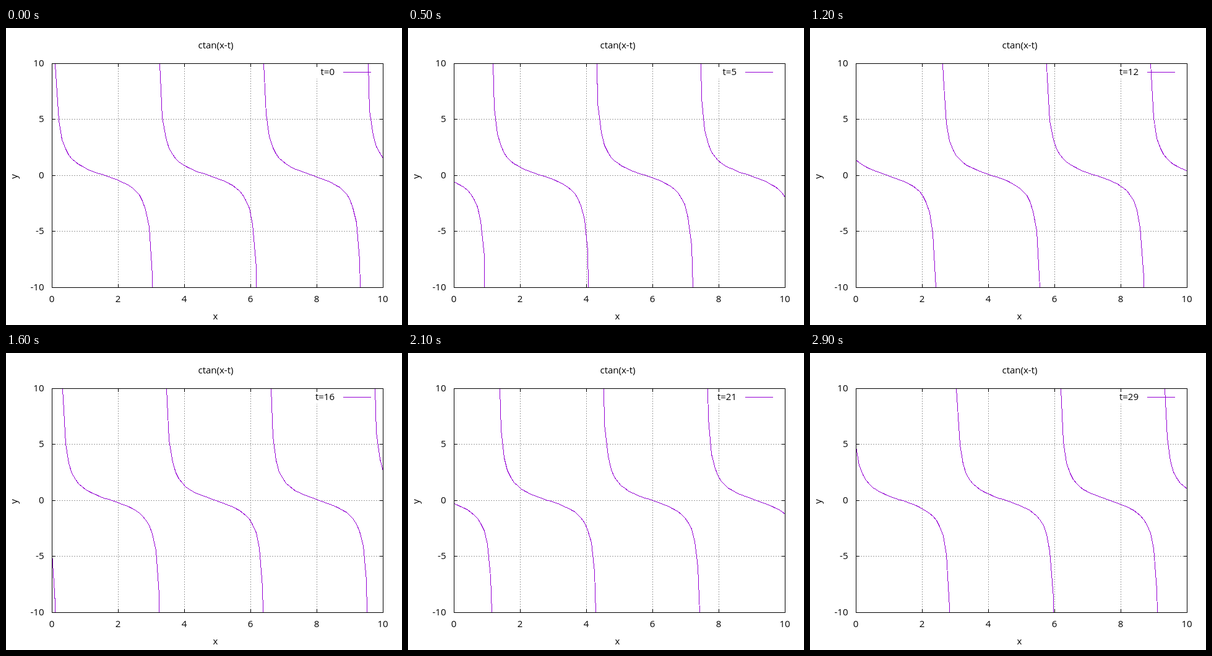
An HTML page that plays this animation: 640x480 px, repeating every 3 s.

```html
<!DOCTYPE html>
<html lang="en">
<head>
<meta charset="utf-8">
<title>ctan(x-t)</title>
<style>
  html, body { margin: 0; width: 100%; height: 100%; overflow: hidden; background: #fff; }
  svg { display: block; }
  path { fill: none; stroke: #000; shape-rendering: crispEdges; }
  #grid { stroke: #a0a0a0; stroke-dasharray: 2 2; }
  #curve, #sample { stroke: #9400d3; }
  text { font: 15px "Open Sans", sans-serif; }
  .mid { text-anchor: middle; }
  .end { text-anchor: end; }
</style>
</head>
<body>
<svg width="640" height="480" viewBox="0 0 640 480">
  <path id="grid"/>
  <g id="labels"></g>
  <text class="mid" x="339" y="33">ctan(x-t)</text>
  <text class="mid" x="338.5" y="471">x</text>
  <text class="mid" transform="translate(18 240) rotate(-90)">y</text>
  <text class="end" id="key" x="531" y="76"></text>
  <path id="sample" d="M545 71.5H590"/>
  <path id="curve"/>
  <path id="axes"/>
</svg>
<script>
const LEFT = 74, RIGHT = 609, TOP = 57, BOTTOM = 419, TIC = 5;
const SAMPLES = 100, FRAMES = 30, FRAME_MS = 100, LIMIT = 10;
const $ = id => document.getElementById(id);
const px = x => Math.round(LEFT + x / 10 * (RIGHT - LEFT)) + 0.5;
const py = y => Math.floor((TOP + BOTTOM) / 2 - y / 20 * (BOTTOM - TOP)) + 0.5;

function label(text, x, y, cls) {
  const el = document.createElementNS("http://www.w3.org/2000/svg", "text");
  el.setAttribute("x", x);
  el.setAttribute("y", y);
  el.setAttribute("class", cls);
  el.textContent = text;
  $("labels").append(el);
}

function drawFrame() {
  let grid = "";
  let axes = `M${LEFT + 0.5} ${TOP + 0.5}H${RIGHT + 0.5}V${BOTTOM + 0.5}H${LEFT + 0.5}Z`;
  for (let x = 0; x <= 10; x += 2) {
    const p = px(x);
    label(x, p - 0.5, 443, "mid");
    axes += `M${p} ${BOTTOM}v${-TIC}M${p} ${TOP}v${TIC + 1}`;
    // The grid stops below the key
    if (x > 0 && x < 10) grid += `M${p} ${BOTTOM}V${x === 8 ? 82 : TOP}`;
  }
  for (let y = -10; y <= 10; y += 5) {
    const p = py(y);
    label(y, 61.5, p + 4.5, "end");
    axes += `M${LEFT} ${p}h${TIC + 1}M${RIGHT} ${p}h${-TIC}`;
    if (Math.abs(y) < 10) grid += `M${LEFT} ${p}H${RIGHT}`;
  }
  $("grid").setAttribute("d", grid);
  $("axes").setAttribute("d", axes);
}

const inside = p => Math.abs(p.y) <= LIMIT;

// Point where the segment from a (inside) to b (outside) leaves the plot
function clip(a, b) {
  const y = Math.sign(b.y) * LIMIT;
  return { x: a.x + (b.x - a.x) * (y - a.y) / (b.y - a.y), y };
}

function curve(t) {
  const shift = t * Math.PI / 15;
  const at = i => {
    const x = 10 * i / (SAMPLES - 1);
    return { x, y: 1 / Math.tan(x - shift) };
  };
  let d = "", a = at(0);
  for (let i = 1; i < SAMPLES; i++) {
    const b = at(i);
    if (inside(a) || inside(b)) {
      const p = inside(a) ? a : clip(b, a);
      const q = inside(b) ? b : clip(a, b);
      if (!d || !inside(a)) d += `M${px(p.x)} ${py(p.y)}`;
      if (!d) d = `M${px(p.x)} ${py(p.y)}`;
      d += `L${px(q.x)} ${py(q.y)}`;
    }
    a = b;
  }
  return d;
}

let shown = -1;
function tick() {
  const t = Math.floor(performance.now() / FRAME_MS) % FRAMES;
  if (t !== shown) {
    shown = t;
    $("curve").setAttribute("d", curve(t));
    $("key").textContent = "t=" + t;
  }
  requestAnimationFrame(tick);
}

drawFrame();
tick();
</script>
</body>
</html>
```
